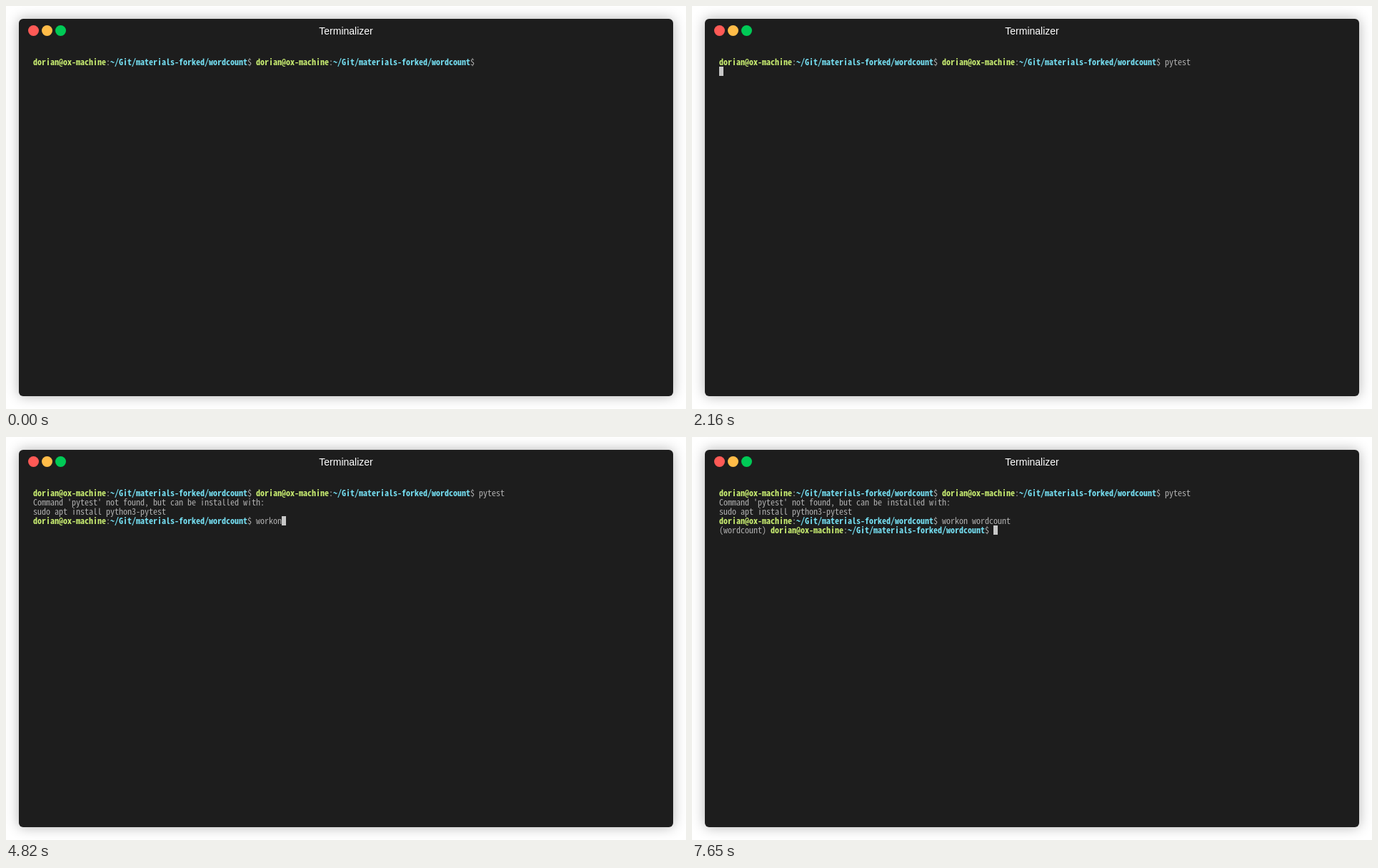
An HTML page for the animation above (8000 ms loop, 952 px wide and 565 px high).

```html
<!DOCTYPE html>
<html lang="en">
<head>
<meta charset="utf-8">
<title>Terminal session</title>
<style>
  html, body { margin: 0; width: 100%; height: 100%; overflow: hidden; background: #fff; }
  .window {
    position: absolute; left: 18px; top: 18px; width: 916px; height: 529px;
    border-radius: 6px; background: #1d1d1d; box-shadow: 0 0 18px rgba(0, 0, 0, .3);
  }
  .dot { position: absolute; top: 9px; width: 15px; height: 15px; border-radius: 50%; }
  .title {
    position: absolute; left: 0; right: 0; top: 9px; text-align: center;
    font: 14px/16px "Liberation Sans", Arial, sans-serif; color: #fff;
  }
  .screen {
    position: absolute; left: 20px; top: 54px; margin: 0; color: #afafaf;
    font: 12px/13px "Noto Sans Mono CJK JP", "Noto Sans Mono CJK SC", "Noto Sans Mono", monospace;
    font-weight: 300; white-space: pre; font-variant-ligatures: none;
  }
  .line { position: relative; top: -1px; height: 13px; }
  b { font-weight: 700; }
  .user { color: #c8ed71; }
  .path { color: #75dff2; }
  .cursor { position: absolute; width: 6px; height: 13px; background: #c7c7c7; }
</style>
</head>
<body>
<div class="window">
  <div class="dot" style="left: 13px; background: #ff5a56"></div>
  <div class="dot" style="left: 32px; background: #ffbc48"></div>
  <div class="dot" style="left: 51px; background: #00ca56"></div>
  <div class="title">Terminalizer</div>
  <div class="screen" id="screen"></div>
</div>
<script>
  const LOOP = 8000, CELL = 6, ROW = 13;
  const prompt = '<b class="user">dorian@ox-machine</b>:<b class="path">~/Git/materials-forked/wordcount</b>$ ';
  const start = prompt + prompt;
  const ran = start + 'pytest\n';
  const failed = ran + "Command 'pytest' not found, but can be installed with:\nsudo apt install python3-pytest\n";
  const ready = failed + prompt;
  const activated = ready + 'workon wordcount\n';

  // Each entry: start time in ms and everything printed so far.
  const steps = [
    [0, start],
    [670, start + 'p'],
    [940, start + 'py'],
    [1090, start + 'pyt'],
    [1140, start + 'pyte'],
    [1310, start + 'pytes'],
    [1370, start + 'pytest'],
    [2160, ran],
    [2230, failed],
    [2250, ready],
    [4250, ready + 'w'],
    [4530, ready + 'wo'],
    [4630, ready + 'wor'],
    [4720, ready + 'work'],
    [4820, ready + 'workon'],
    [6820, ready + 'workon '],
    [6930, ready + 'workon wordcount '],
    [7270, activated],
    [7650, activated + '(wordcount) ' + prompt]
  ];

  const screen = document.getElementById('screen');
  let shown = -1;

  function draw(index) {
    const lines = steps[index][1].split('\n');
    const row = lines.length - 1;
    const column = lines[row].replace(/<[^>]*>/g, '').length;
    const cursor = index === 0 ? '' :
      `<div class="cursor" style="left:${column * CELL}px;top:${row * ROW}px"></div>`;
    screen.innerHTML = lines.map(line => `<div class="line">${line}</div>`).join('') + cursor;
  }

  const origin = performance.now();
  function tick() {
    const time = (performance.now() - origin) % LOOP;
    const index = steps.findLastIndex(step => step[0] <= time);
    if (index !== shown) draw(shown = index);
    requestAnimationFrame(tick);
  }
  tick();
</script>
</body>
</html>
```
